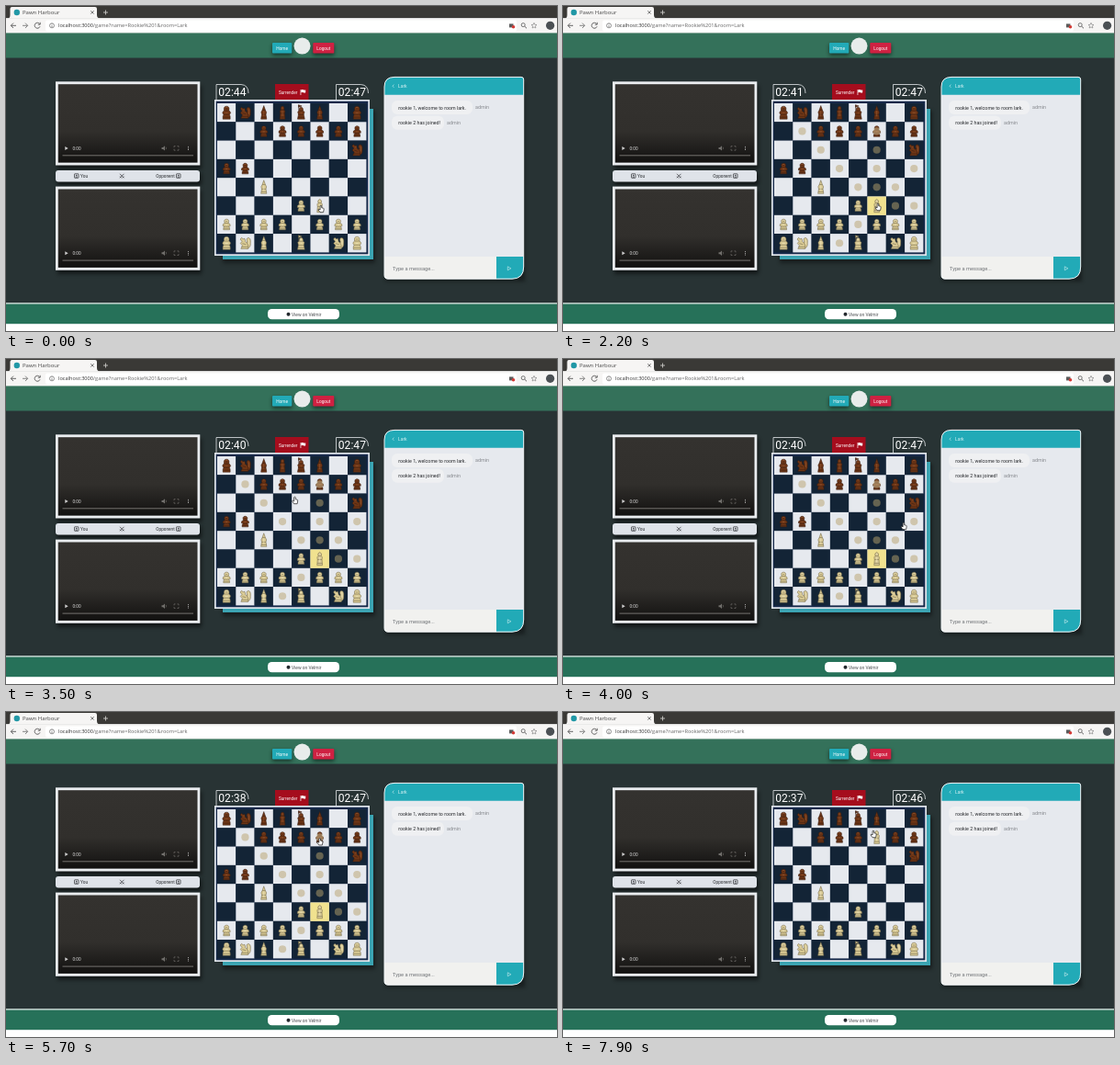
Write an HTML page that moves like this. It is 600 px wide and 354 px high and loops after 8 s.

```html
<!DOCTYPE html>
<html lang="en">
<head>
<meta charset="utf-8">
<title>Pawn Harbour</title>
<style>
  html, body { margin: 0; width: 100%; height: 100%; overflow: hidden; background: #fff; }
  svg { display: block; width: 100%; height: 100%; }
  text { font-family: Roboto, "Open Sans", sans-serif; white-space: pre; }
  .browser text { font-family: "Open Sans", "Noto Sans", sans-serif; }
  .brown { color: #6f3616; --line: #351a0e; --glow: #a2643c; }
  .cream { color: #d8c994; --line: #6b6044; --glow: #f6eecd; }
  .piece { fill: currentColor; stroke: var(--line); stroke-width: .5; stroke-linejoin: round; }
</style>
</head>
<body>
<svg id="stage" viewBox="0 0 600 354">
  <defs>
    <linearGradient id="screen" x2="0" y2="1">
      <stop offset="0" stop-color="#34322f"/><stop offset=".6" stop-color="#312f2c"/>
      <stop offset="1" stop-color="#121110"/>
    </linearGradient>
    <filter id="soft" x="-20%" y="-40%" width="140%" height="180%"><feGaussianBlur stdDeviation="2"/></filter>

    <g id="pawn">
      <path d="M-3.4 5.8 Q-3.6 3 -2.3 2 L-4 1.8 Q-4.6 -.8 -2 -1.4 Q-3.5 -5.6 0 -5.8 Q3.5 -5.6 2 -1.4 Q4.6 -.8 4 1.8 L2.3 2 Q3.6 3 3.4 5.8 Z"/>
      <path d="M-2 -1.4 H2 M-2.3 2.2 H2.3 M-3.2 4.3 H3.2 M-1 -3.6 H1" fill="none"/>
      <path d="M-.9 -4.5 h1.8 M-1.1 .4 h2.2" style="stroke:var(--glow)"/>
    </g>
    <g id="rook">
      <path d="M-4 7 Q-4.4 3.6 -3.2 2 L-4.4 .6 Q-4.3 -1.6 -2.6 -2.2 Q-3.7 -6.8 0 -7 Q3.7 -6.8 2.6 -2.2 Q4.3 -1.6 4.4 .6 L3.2 2 Q4.4 3.6 4 7 Z"/>
      <path d="M-2.6 -2.2 H2.6 M-3.2 2 H3.2 M-3.9 5 H3.9 M-1.2 -4.4 H1.2" fill="none"/>
      <path d="M-1.2 -5.5 h2.4 M-1.6 .2 h3.2" style="stroke:var(--glow)"/>
    </g>
    <g id="knight">
      <path d="M1.3 6 Q6.3 5.4 5.8 0 Q6.4 -6 3 -5.8 Q.5 -4.8 2.4 -1 L1 0 Z"/>
      <path d="M-4.6 6.2 L-3.1 2.6 L-5.2 .3 L-3.5 -1.8 L-5.4 -4.2 L-3.9 -6 L-2.3 -4.5 L-.5 -5 L.2 -1.6 Q3.6 0 3.3 6.2 Z"/>
      <path d="M-4 4.2 H3.1 M-3 .3 L.8 1.6" fill="none"/>
      <path d="M3.8 -3.8 Q4.6 -2 4 1.8 M-2 -3 h1" fill="none" style="stroke:var(--glow)"/>
    </g>
    <g id="bishop">
      <path d="M-3.1 7 L-2.3 2 L-2.9 -.5 L-1.7 -2.8 L0 -7.6 L1.7 -2.8 L2.9 -.5 L2.3 2 L3.1 7 Z"/>
      <path d="M-1.7 -2.8 H1.7 M-2.3 2 H2.3 M-2.9 5 H2.9" fill="none"/>
      <path d="M0 -2 V4" style="stroke:var(--glow)"/>
    </g>
    <g id="queen">
      <path d="M-2.9 7 L-2.4 1 L-2.8 -1.8 L-1.7 -3 Q-2.8 -6.4 0 -7.2 Q2.8 -6.4 1.7 -3 L2.8 -1.8 L2.4 1 L2.9 7 Z"/>
      <path d="M-1.7 -3 H1.7 M-2.4 .8 H2.4 M-2.7 4.8 H2.7" fill="none"/>
      <path d="M0 -2 V3.8 M-.7 -5 h1.4" style="stroke:var(--glow)"/>
    </g>
    <g id="king">
      <path d="M-2.8 -8.5 V3 M-2.8 -8.5 L.8 -7.2 L-2.8 -5.8 Z"/>
      <path d="M-3.9 7 L-2.9 2 L-3.7 -.8 L-2.1 -2 Q-2.6 -5.6 0 -5.9 Q2.6 -5.6 2.1 -2 L3.7 -.8 L2.9 2 L3.9 7 Z"/>
      <path d="M-2.1 -2 H2.1 M-2.9 2.2 H2.9 M-3.6 5 H3.6" fill="none"/>
      <path d="M-1 -4 h2 M0 -.5 v1.5" style="stroke:var(--glow)"/>
    </g>
  </defs>
</svg>
<script>
const LOOP = 8000, LEFT = 230, TOP = 106, CELL = 20.3;
const PALE = '#e6e9ee', TEAL = '#22aab7', INK = '#27292d';
const stage = document.getElementById('stage');

function add(tag, attrs = {}, parent = stage) {
  const node = document.createElementNS(stage.namespaceURI, tag);
  for (const key in attrs) node.setAttribute(key, attrs[key]);
  parent.append(node);
  return node;
}
const group = (attrs, parent) => add('g', attrs, parent);
const rect = (x, y, width, height, fill, more, parent) =>
  add('rect', { x, y, width, height, fill, ...more }, parent);
const disc = (cx, cy, r, fill, more, parent) => add('circle', { cx, cy, r, fill, ...more }, parent);
const shape = (d, fill, parent) => add('path', { d, fill }, parent);
const line = (d, stroke, width = .8, parent) =>
  add('path', { d, fill: 'none', stroke, 'stroke-width': width }, parent);
function label(x, y, words, size, fill = INK, more, parent) {
  const node = add('text', { x, y, 'font-size': size, fill, ...more }, parent);
  node.textContent = words;
  return node;
}
const middle = { 'text-anchor': 'middle' };
const shadow = (x, y, w, h, opacity = .55) =>
  rect(x, y, w, h, '#000', { opacity, filter: 'url(#soft)' });

function drawBrowser() {
  const bar = group({ class: 'browser' });
  rect(0, 0, 600, 13.4, '#3a3936', {}, bar);
  rect(0, 13.3, 600, 16.2, '#f6f5f4', {}, bar);
  shape('M3 13.5 Q4.5 13 4.5 10 V3 Q4.5 1 6.5 1 H97 Q99 1 99 3 V10 Q99 13 101 13.5 Z', '#f6f5f4', bar);
  disc(11.8, 7, 3.2, '#2298a6', {}, bar);
  label(18, 9.4, 'Pawn Harbour', 6, '#444', {}, bar);
  line('M92.3 5.2 l3.4 3.4 m0 -3.4 l-3.4 3.4', '#555', .8, bar);
  line('M106 7 H111 M108.5 4.5 V9.5', '#c9c8c5', .9, bar);
  rect(43, 15.6, 513, 11.8, '#fff', { rx: 2 }, bar);
  line('M11 21.3 H5.5 M8 18.6 L5.3 21.3 L8 24', '#555', .9, bar);
  line('M18 21.3 H23.5 M21 18.6 L23.7 21.3 L21 24', '#777', .9, bar);
  line('M36.7 19.6 A3 3 0 1 0 37 22.3 M37.2 17.8 V20.2 H34.8', '#555', .9, bar);
  disc(50, 21.3, 2.5, 'none', { stroke: '#666', 'stroke-width': .7 }, bar);
  line('M50 20.8 V23 M50 19.4 V20', '#666', .7, bar);
  const url = label(57, 23.4, 'localhost:3000', 5.65, '#333', {}, bar);
  add('tspan', { fill: '#666' }, url).textContent = '/game?name=Rookie%201&room=Lark';
  rect(548, 19.4, 4.5, 4, '#5b5b5b', {}, bar);
  disc(552.5, 22.8, 1.8, '#d33a35', {}, bar);
  disc(563.2, 20.6, 2, 'none', { stroke: '#555', 'stroke-width': .8 }, bar);
  line('M564.7 22.1 L567 24.3', '#555', .9, bar);
  line('M575 18.3 l.9 2 2.1 .2 -1.6 1.4 .5 2.1 -1.9 -1.1 -1.9 1.1 .5 -2.1 -1.6 -1.4 2.1 -.2 Z', '#777', .6, bar);
  disc(592.6, 21.3, 4.6, '#4b5054', {}, bar);
}

function drawPage() {
  rect(0, 29.4, 600, 27.6, '#34715a');
  rect(0, 56.5, 600, 267, '#283334');
  rect(0, 323.4, 600, 1.3, '#c3d6d0');
  rect(0, 324.6, 600, 21.6, '#267159');

  const button = (x, y, w, h, fill, words) => {
    shadow(x, y + 2, w, h);
    rect(x, y, w, h, fill, { rx: 1 });
    label(x + w / 2, y + h / 2 + 1.7, words, 4.8, '#fff', middle);
  };
  button(290, 40, 21.3, 11.6, TEAL, 'Home');
  button(334.3, 40, 23, 11.6, '#cf2142', 'Logout');
  disc(322.5, 43.6, 9, '#e8eceb');

  rect(285, 330, 78, 11.3, '#fff', { rx: 4.5 });
  disc(307.5, 335.7, 2, '#24292e');
  label(311, 337.5, 'View on Velmir', 4.9, '#4a4d50');
}

function drawVideo(y) {
  shadow(56, y + 4, 157, 91);
  rect(54, y, 157.3, 91.2, '#e9ecef');
  rect(56.8, y + 2.9, 151.7, 85.4, 'url(#screen)');
  const mid = y + 72.6;
  shape(`M64.3 ${mid - 2} L67.7 ${mid} L64.3 ${mid + 2} Z`, '#ccc');
  label(72.5, mid + 1.6, '0:00', 4.7, '#dcdcdc');
  shape(`M169.5 ${mid - 1} h1.5 l2 -1.7 v5.4 l-2 -1.7 h-1.5 Z`, '#716f6c');
  line(`M174 ${mid - 1.3} q1.3 1.3 0 2.6`, '#716f6c', .6);
  line(`M183 ${mid - .8} v-1.5 h1.5 m2 0 h1.5 v1.5 m0 1.6 v1.5 h-1.5 m-2 0 h-1.5 v-1.5`, '#716f6c', .7);
  for (const dy of [-1.7, 0, 1.7]) disc(198.5, mid + dy, .5, '#ccc');
  rect(61.5, mid + 7.4, 142.5, 1, '#75736f');
}

function drawLegend() {
  shadow(56, 182, 157, 13);
  rect(54, 179, 157, 12.6, '#dfe3e9', { rx: 3 });
  for (const x of [74.5, 185.5]) {
    rect(x, 182.8, 4.5, 4.5, 'none', { stroke: INK, 'stroke-width': .7, rx: .5 });
    disc(x + 2.25, 184.5, .7, INK);
    rect(x + 1.2, 185.7, 2.1, .8, INK);
  }
  label(81, 186.9, 'You', 4.8);
  label(183.7, 186.9, 'Opponent', 4.7, INK, { 'text-anchor': 'end' });
  line('M124 182.8 L128.5 187.3 M128.5 182.8 L124 187.3 M124 185.7 L125.6 187.3 M128.5 185.7 L126.9 187.3', INK, .7);
}

function drawChat() {
  const top = 'V88 Q412 77.4 423 77.4 H561 Q563.7 77.4 563.7 80 V';
  const outline = `M412 293 ${top}284 Q563.7 297.2 551 297.2 H416 Q412 297.2 412 293 Z`;
  shadow(413, 83, 152, 217, .4);
  shape(outline, PALE);
  shape(`M412 96.8 ${top}96.8 Z`, TEAL);
  line('M422.4 85.6 L421 87.2 L422.4 88.8', '#d8f2f4', .6);
  label(427, 89, 'Lark', 5, '#d8f2f4');

  const message = (y, width, words) => {
    rect(420, y, width, 15, '#eff0f2', { rx: 6 });
    label(427.3, y + 9.6, words, 5.3, INK);
    label(420 + width + 3, y + 9.2, 'admin', 5.4, '#85888d');
  };
  message(103, 88, 'rookie 1, welcome to room lark.');
  message(119.7, 57, 'rookie 2 has joined!');

  shape('M412 273 H534 V297.2 H416 Q412 297.2 412 293 Z', '#f1f1ef');
  label(421, 287.7, 'Type a message...', 5.7, '#707377');
  shape('M534 273 H563.7 V284 Q563.7 297.2 551 297.2 H534 Z', TEAL);
  line('M546.3 283.8 L549.9 285.8 L546.3 287.8 Z', '#cdeef0', .6);
  line(outline, '#eef2f4', 1);
}

function drawClock(x) {
  line(`M${x} 102 V85.5 H${x + 27} Q${x + 35} 86 ${x + 35} 95`, '#e4e8ea', .8);
  return label(x + 17.4, 98.2, '', 12.1, '#fff', middle);
}

function drawBoardFrame() {
  rect(293, 85, 36.5, 17.5, '#a50d1d');
  label(297, 95.8, 'Surrender', 4.7, '#fff');
  shape('M320.6 91 h.7 v6 h-.7 Z M321.5 91.3 q1.5 -.7 2.5 0 t2.2 0 v3 q-1.2 .7 -2.2 0 t-2.5 0 Z', '#fff');
  shadow(236, 114, 166, 166, .4);
  rect(236, 112, 164, 164, '#3ba4b2');
  rect(227, 102, 169, 170, '#e3e8ef');
  rect(228.7, 103.7, 165.6, 166.6, '#17294a');
  for (let i = 0; i < 64; i++) {
    const row = i >> 3, col = i & 7;
    rect(LEFT + col * CELL, TOP + row * CELL, CELL, CELL, (row + col) % 2 ? '#132436' : PALE);
  }
}

const centre = (row, col) => [LEFT + (col + .5) * CELL, TOP + (row + .5) * CELL];
const kinds = { p: 'pawn', r: 'rook', n: 'knight', b: 'bishop', q: 'queen', k: 'king' };

// Lower case is brown, upper case is cream.
const layout = ['rnbqkb.r', '..pppppp', '.......n', 'pp......', '..B.....', '....PQ..', 'PPPP.PPP', 'RNB.K.NR'];

function place(letter, row, col) {
  const [x, y] = centre(row, col);
  const kind = letter.toLowerCase();
  return add('use', {
    href: '#' + kinds[kind],
    class: 'piece ' + (letter === kind ? 'brown' : 'cream'),
    transform: `translate(${x} ${y})`
  });
}

drawBrowser();
drawPage();
drawVideo(82.3);
drawLegend();
drawVideo(196.6);
drawChat();
const myClock = drawClock(229), rivalClock = drawClock(359.5);
drawBoardFrame();

const hints = group();
rect(LEFT + 5 * CELL, TOP + 5 * CELL, CELL, CELL, '#f1e28f', {}, hints);

const pieces = {};
layout.forEach((text, row) => [...text].forEach((letter, col) => {
  if (letter !== '.') pieces[`${row}${col}`] = place(letter, row, col);
}));
const queen = pieces['55'], target = pieces['15'];

// Rays of the queen on row 5, column 5: direction and reach.
const rays = [[-1, 0, 4], [-1, 1, 2], [-1, -1, 4], [0, 1, 2], [1, -1, 2]];
for (const [dr, dc, reach] of rays)
  for (let n = 1; n <= reach; n++) {
    if (dc === 0 && n === reach) continue;
    const [x, y] = centre(5 + dr * n, 5 + dc * n);
    disc(x, y, 4.1, '#b8a26c', { opacity: .5 }, hints);
  }
const captureMark = disc(...centre(1, 5), 4.1, '#d6c69a', { opacity: .5 });

const hand = add('path', {
  d: 'M-.9 -3.4 Q0 -4.3 .7 -3.4 V-1.2 L2.6 -.8 Q3.4 -.5 3.1 .9 L2.6 3.7 H-1 L-2.9 1 Q-3 0 -2 .2 L-.9 1 Z',
  fill: '#fff', stroke: '#1a1a1a', 'stroke-width': .7, 'stroke-linejoin': 'round'
});

// Pointer stops: time, x, y.
const route = [
  [0, 343, 221], [200, 343, 219], [2400, 343, 219], [2900, 244, 119], [3000, 244, 119],
  [3900, 371, 182], [4000, 371, 182], [4500, 346, 160], [4600, 346, 160], [5000, 341, 146],
  [5500, 342, 142], [6300, 341, 139], [7400, 341, 139], [7900, 338, 133], [LOOP, 338, 133]
];
function pointerAt(time) {
  const t = Math.floor(time / 100) * 100;
  const i = route.findIndex(stop => stop[0] > t);
  const [t0, x0, y0] = route[i - 1], [t1, x1, y1] = route[i];
  const k = (t - t0) / (t1 - t0);
  return [x0 + (x1 - x0) * k, y0 + (y1 - y0) * k];
}

const show = (node, on) => node.setAttribute('visibility', on ? 'visible' : 'hidden');
const SELECT = 1200, MOVE = 7000;

function render(t) {
  const ticks = Math.min(7, Math.max(0, Math.floor((t + 800) / 1000)));
  myClock.textContent = '02:' + (44 - ticks);
  rivalClock.textContent = t < 7900 ? '02:47' : '02:46';

  const choosing = t >= SELECT && t < MOVE;
  show(hints, choosing);
  show(captureMark, choosing);
  show(target, t < MOVE);
  const [x, y] = centre(t < MOVE ? 5 : 1, 5);
  queen.setAttribute('transform', `translate(${x} ${y})`);
  hand.setAttribute('transform', `translate(${pointerAt(t)})`);
}

const start = performance.now();
function frame() {
  render((performance.now() - start) % LOOP);
  requestAnimationFrame(frame);
}
frame();
</script>
</body>
</html>
```
